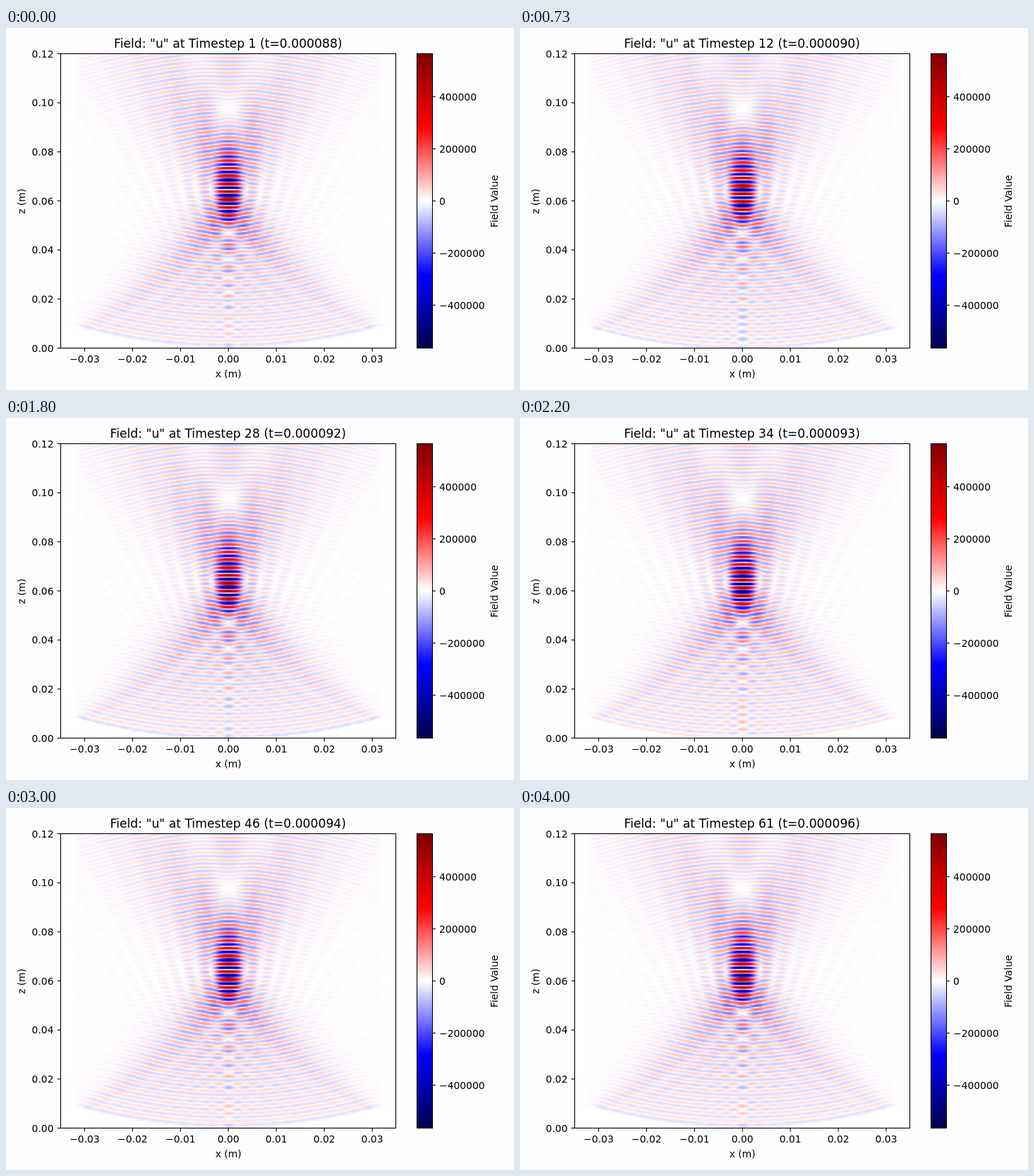
Animation of 720x514 px, one loop 4070 ms. Source, as an HTML page with a canvas:

```html
<!DOCTYPE html>
<html lang="en">
<head>
<meta charset="utf-8">
<title>Focused bowl field</title>
<style>
  html, body { margin: 0; width: 100%; height: 100%; overflow: hidden; background: #fdfdff; }
  canvas, svg { position: absolute; display: block; }
  canvas { left: 77.5px; top: 37px; width: 475.5px; height: 417.5px; }
  svg { left: 0; top: 0; }
  text { font: 13.89px "DejaVu Sans", sans-serif; fill: #000; }
  #title { font-size: 17.2px; }
  .line { fill: none; stroke: #000; stroke-width: 1.11; }
</style>
</head>
<body>
<canvas id="field" width="140" height="240"></canvas>
<svg id="plot" width="720" height="514" viewBox="0 0 720 514">
  <defs>
    <linearGradient id="seismic" x1="0" y1="1" x2="0" y2="0">
      <stop offset="0" stop-color="#00004c"/>
      <stop offset=".25" stop-color="#00f"/>
      <stop offset=".5" stop-color="#fff"/>
      <stop offset=".75" stop-color="#f00"/>
      <stop offset="1" stop-color="#800000"/>
    </linearGradient>
  </defs>
  <rect x="583" y="37" width="21" height="417.5" fill="url(#seismic)"/>
  <rect class="line" x="582.5" y="36.5" width="22" height="418"/>
  <rect class="line" x="77.5" y="36.5" width="475" height="418"/>
  <text id="title" x="314.8" y="27.5" text-anchor="middle"></text>
</svg>
<script>
const LOOP = 4070, STEPS = 61;
const PERIOD = 2, DT = 2 / 15, START = 88 + DT; // microseconds
const LAMBDA = 3, K = 2 * Math.PI / LAMBDA;     // lengths in mm
const RADIUS = 64, MAX_ANGLE = Math.PI / 6;
const COLS = 140, ROWS = 240, HALF = COLS / 2, CELL = 0.5;

const plot = document.getElementById('plot');
const title = document.getElementById('title');
const ctx = document.getElementById('field').getContext('2d');
const image = ctx.createImageData(COLS, ROWS);

function add(name, attrs, content = '') {
  const node = document.createElementNS('http://www.w3.org/2000/svg', name);
  for (const key in attrs) node.setAttribute(key, attrs[key]);
  node.textContent = content;
  plot.appendChild(node);
}

const label = (x, y, content, anchor = 'middle') =>
  add('text', { x, y, 'text-anchor': anchor }, content);
const tick = d => add('path', { class: 'line', d });
const sideLabel = (x, y, content) =>
  add('text', { transform: `translate(${x} ${y}) rotate(-90)`, 'text-anchor': 'middle' }, content);
const signed = s => s.replace('-', '\u2212');

function drawAxes() {
  for (let i = -3; i <= 3; i++) {
    const x = 315.25 + i * 67.93;
    tick(`M${x} 454.5v4.9`);
    label(x, 475, signed((i / 100).toFixed(2)));
  }
  for (let i = 0; i <= 6; i++) {
    const y = 454.5 - i * 418 / 6;
    tick(`M77.5 ${y}h-4.9`);
    label(67.5, y + 5.2, (i / 50).toFixed(2), 'end');
  }
  for (let i = -2; i <= 2; i++) {
    const y = 245.6 - i * 74;
    tick(`M604 ${y}h4.9`);
    label(614, y + 5.2, signed(String(i * 200000)), 'start');
  }
  label(315.2, 496, 'x (m)');
  sideLabel(26.5, 246, 'z (m)');
  sideLabel(696.5, 246, 'Field Value');
}

// Spherical waves summed over the bowl; one half of the symmetric slice.
function solveField() {
  const RES = 50, SIZE = 160 * RES;
  const waveCos = new Float32Array(SIZE), waveSin = new Float32Array(SIZE);
  for (let i = 1; i < SIZE; i++) {
    const d = i / RES;
    waveCos[i] = Math.cos(K * d) / d;
    waveSin[i] = Math.sin(K * d) / d;
  }

  const RINGS = 40, rings = [];
  for (let i = 0; i < RINGS; i++) {
    const angle = (i + 0.5) / RINGS * MAX_ANGLE;
    const rho = RADIUS * Math.sin(angle);
    const count = Math.ceil(8 + 2 * rho);
    const cosines = Float64Array.from({ length: count },
      (_, j) => 2 * rho * Math.cos((j + 0.5) / count * Math.PI));
    rings.push({ rho, z: RADIUS * (1 - Math.cos(angle)), weight: rho / count, cosines });
  }

  const re = new Float32Array(HALF * ROWS), im = new Float32Array(HALF * ROWS);
  const rim = RADIUS * Math.sin(MAX_ANGLE);
  const soften = 0.8;
  let peak = 0;
  for (let row = 0; row < ROWS; row++) {
    const z = (row + 0.5) * CELL;
    for (let col = 0; col < HALF; col++) {
      const r = (col + 0.5) * CELL;
      const edge = Math.min(r, rim);
      if (z < RADIUS - Math.sqrt(RADIUS * RADIUS - edge * edge)) continue;
      let c = 0, s = 0;
      for (const ring of rings) {
        const base = r * r + ring.rho ** 2 + (z - ring.z) ** 2 + soften;
        const cosines = ring.cosines;
        let ringC = 0, ringS = 0;
        for (let j = 0; j < cosines.length; j++) {
          const index = (Math.sqrt(base - r * cosines[j]) * RES + 0.5) | 0;
          ringC += waveCos[index];
          ringS += waveSin[index];
        }
        c += ringC * ring.weight;
        s += ringS * ring.weight;
      }
      const fade = Math.min(1, Math.max(0, (33 - r) / 2));
      const at = row * HALF + col;
      re[at] = c * fade;
      im[at] = s * fade;
      peak = Math.max(peak, Math.hypot(re[at], im[at]));
    }
  }
  return { re, im, peak };
}

function setColor(offset, v) {
  const a = Math.min(1, Math.abs(v));
  const pale = Math.max(0, 255 * (1 - 2 * a));
  const deep = Math.max(0, 2 * a - 1);
  const data = image.data;
  data[offset] = v > 0 ? 255 - 127 * deep : pale;
  data[offset + 1] = pale;
  data[offset + 2] = v > 0 ? pale : 255 - 179 * deep;
  data[offset + 3] = 255;
}

function drawStep(step) {
  const time = START + step * DT;
  // The bowl is driven with a negative sine.
  const phase = 2 * Math.PI * time / PERIOD + Math.PI;
  const sin = Math.sin(phase) / field.peak, cos = Math.cos(phase) / field.peak;
  for (let row = 0; row < ROWS; row++) {
    const line = (ROWS - 1 - row) * COLS;
    for (let col = 0; col < HALF; col++) {
      const at = row * HALF + col;
      const value = sin * field.re[at] - cos * field.im[at];
      setColor(4 * (line + HALF + col), value);
      setColor(4 * (line + HALF - 1 - col), value);
    }
  }
  ctx.putImageData(image, 0, 0);
  title.textContent = `Field: "u" at Timestep ${step + 1} (t=${(time * 1e-6).toFixed(6)})`;
}

// Steps run at 15 per second, rounded to hundredths of a second.
function stepAt(ms) {
  let step = Math.min(STEPS - 1, Math.floor(ms * 0.015) + 1);
  while (Math.round(step * 20 / 3) * 10 > ms) step--;
  return step;
}

drawAxes();
const field = solveField();
let shown = 0, origin = null;
drawStep(0);

function animate(now) {
  origin ??= now;
  const step = stepAt((now - origin) % LOOP);
  if (step !== shown) drawStep(shown = step);
  requestAnimationFrame(animate);
}
requestAnimationFrame(animate);
</script>
</body>
</html>
```
